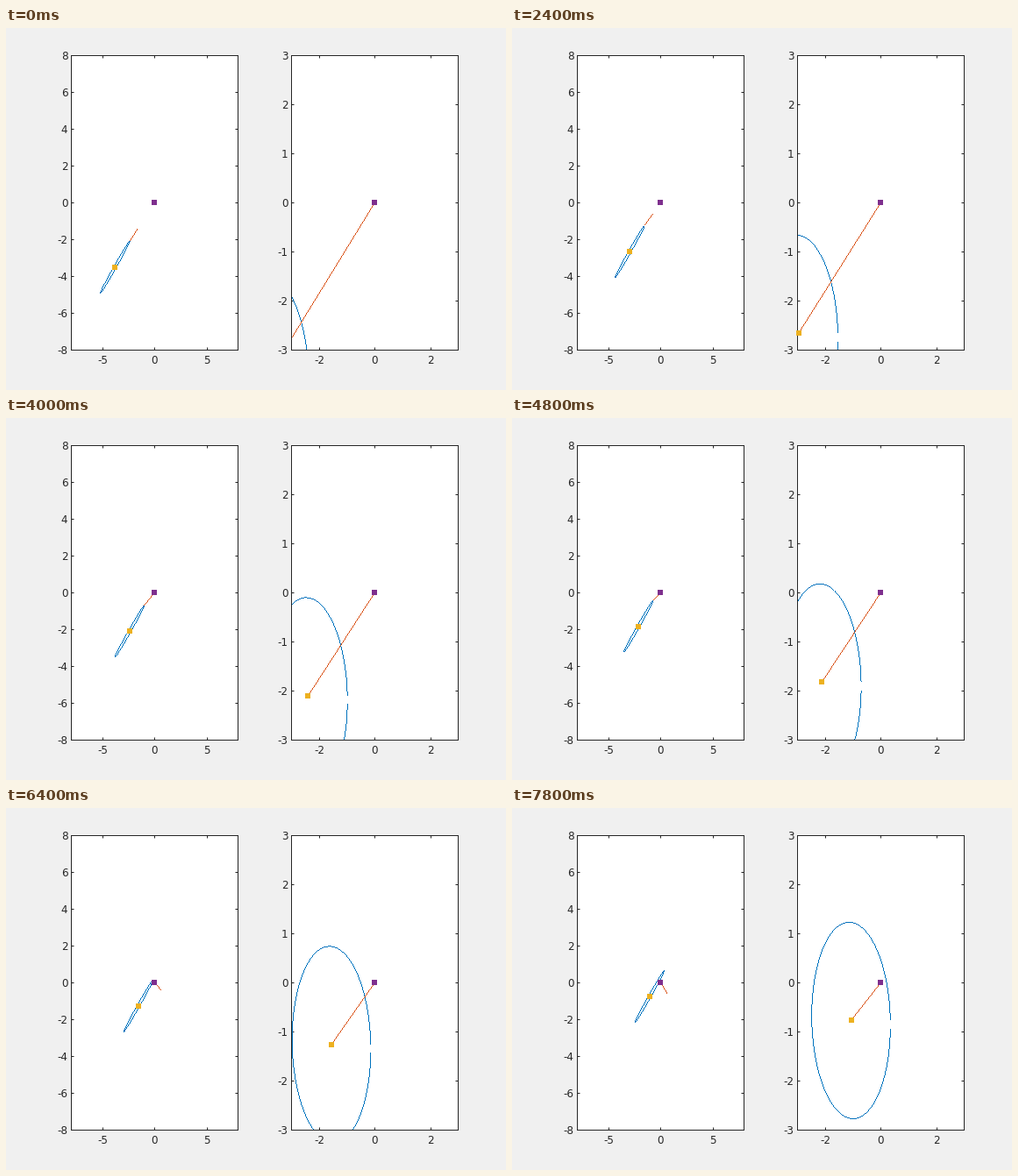
Write a matplotlib script that moves like this. It is 570 px wide and 413 px high and loops after 8 s.

```python
import numpy as np
import matplotlib
import matplotlib.pyplot as plt
from matplotlib.animation import FuncAnimation

W, H, DPI = 570, 413, 100
PX = 72 / DPI                      # points per pixel
FRAMES, STEP_MS = 40, 200
BLUE, RED, YELLOW, PURPLE = "#0072bd", "#d95319", "#edb120", "#7e2f8e"
INK = "#262626"

matplotlib.rcParams["font.family"] = "DejaVu Sans"

# Ellipse with half axes A and B, turned by 45 degrees
A, B = 2.0, 0.1
ROT = np.array([[1, -1], [1, 1]]) / np.sqrt(2)
START, SPEED = np.array([-3.8, -3.5]), 0.07


def ellipse(t):
    return ROT @ np.array([A * np.cos(t), B * np.sin(t)])


ANGLES = np.arange(0, 6.25, 0.1)
OUTLINE = ellipse(ANGLES)
RIM = ellipse(np.linspace(-np.pi / 2, np.pi / 2, 20001))

fig = plt.figure(figsize=(W / DPI, H / DPI), dpi=DPI, facecolor="#f0f0f0")


def make_axes(left, xlim, ylim, xticks, yticks):
    ax = fig.add_axes([left / W, 45.55 / H, 190.05 / W, 336.4 / H])
    ax.set(xlim=(-xlim, xlim), ylim=(-ylim, ylim))
    ax.set_xticks(xticks, [str(v) for v in xticks])
    ax.set_yticks(yticks, [str(v) for v in yticks])
    ax.tick_params(direction="in", top=True, right=True, length=3.4 * PX,
                   width=PX, color=INK, labelcolor=INK, labelsize=12 * PX)
    ax.tick_params(axis="x", pad=6 * PX)
    ax.tick_params(axis="y", pad=4 * PX)
    for spine in ax.spines.values():
        spine.set(linewidth=PX, color=INK)
    return ax


def make_artists(ax):
    curve, ray = (ax.plot([], [], ",", color=c)[0] for c in (BLUE, RED))
    style = dict(marker="s", ms=6.2 * PX, mew=0, ls="", clip_on=False,
                 snap=False, zorder=5)
    center, = ax.plot([], [], color=YELLOW, **style)
    ax.plot([0], [0], color=PURPLE, **style)
    return curve, ray, center


def draw_thin(line, x, y):
    """Show a polyline one pixel thick and without smoothing."""
    to_px = line.axes.transData
    pts = to_px.transform(np.column_stack([x, y]))
    dots = []
    for a, b in zip(pts, pts[1:]):
        d = b - a
        k = np.argmax(np.abs(d))
        lo, hi = sorted((a[k], b[k]))
        s = (np.arange(np.ceil(lo - 0.5), hi - 0.5) + 0.5 - a[k]) / d[k]
        dots.append(np.floor(a + s[:, None] * d))
    line.set_data(*to_px.inverted().transform(np.vstack(dots)).T)


plane = make_artists(make_axes(74.4, 8, 8, [-5, 0, 5], range(-8, 9, 2)))
zoom = make_artists(make_axes(325.4, 3, 3, [-2, 0, 2], range(-3, 4)))


def update(i):
    c = START + SPEED * i
    x, y = OUTLINE + c[:, None]

    # Unit ray from the nearest rim point towards the origin
    rim = RIM + c[:, None]
    near = rim[:, np.argmin((rim ** 2).sum(axis=0))]
    tip = near - near / np.hypot(*near)

    curve, ray, center = plane
    draw_thin(curve, x, y)
    draw_thin(ray, [near[0], tip[0]], [near[1], tip[1]])
    center.set_data([c[0]], [c[1]])

    curve, ray, center = zoom
    draw_thin(curve, x, c[1] + A * np.sin(ANGLES))
    draw_thin(ray, [c[0], 0], [c[1], 0])
    center.set_data([c[0]], [c[1]])
    center.set_visible(bool(np.all(np.abs(c) <= 3)))
    return plane + zoom


anim = FuncAnimation(fig, update, frames=FRAMES, interval=STEP_MS,
                     repeat=True, repeat_delay=0, blit=False)
plt.show()
```
